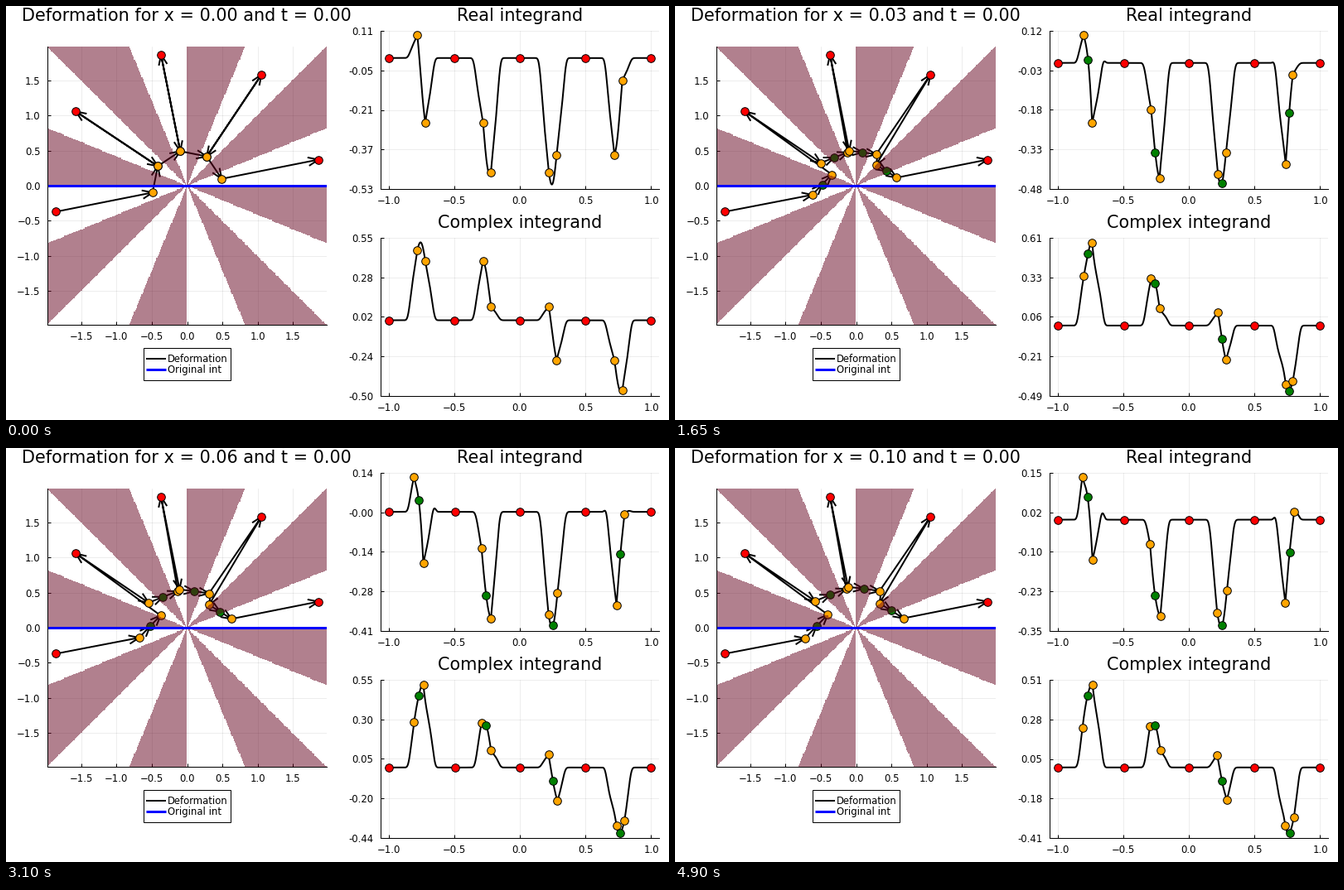
These frames come from a looping animation (800x500 px, 4.95 s). A matplotlib script:

```python
import numpy as np
import matplotlib.pyplot as plt
from matplotlib.animation import FuncAnimation
from matplotlib.patches import Rectangle

W, H, DPI = 800, 500, 100
FRAMES, INTERVAL = 99, 50
PX = 72 / DPI                      # one pixel in points
SPLIT = 27                         # frame at which the single ball breaks up
AMP, LIN, POW = 0.2398, 4.19, 2.81  # integrand constants

plt.rcParams.update({"font.family": "DejaVu Sans", "font.size": 8.4})

# End points in the valleys of exp(i z^8), walked from left to right
valleys = np.exp(1j * np.pi * (1 / 16 + np.arange(4, -1, -1) / 4))
ends = 1.8975 * valleys

# Entry, saddle and exit of each ball at x = 0.1
balls = np.array([
    [-0.726 - 0.152j, -0.563 + 0.020j, -0.402 + 0.185j],
    [-0.582 + 0.378j, -0.366 + 0.467j, -0.140 + 0.552j],
    [-0.115 + 0.580j, 0.1057 + 0.554j, 0.332 + 0.521j],
    [0.3315 + 0.346j, 0.500 + 0.242j, 0.670 + 0.133j],
])


def path(i, x):
    """Nodes of the deformed contour and their colours."""
    nodes, kinds = [], []
    for k in range(4):
        if i < SPLIT:
            inner, names = [0.5 * valleys[k], 0.5 * valleys[k + 1]], "oo"
        else:
            inner, names = balls[k] * (x / 0.1) ** (1 / 7), "ogo"
        nodes += [ends[k], *inner]
        kinds += ["r", *names]
    return np.array(nodes + [ends[4]]), np.array(kinds + ["r"])


def integrand(z, x):
    return -1j * AMP / z * np.exp(1j * (POW * z ** 8 + LIN * x * z))


def arrows(nodes):
    """Shafts and open heads as one polyline broken by NaN."""
    out = []
    for a, b in zip(nodes[:-1], nodes[1:]):
        u = (b - a) / abs(b - a)
        out += [a, b, np.nan,
                b + u * (-0.145 + 0.06j), b, b + u * (-0.145 - 0.06j), np.nan]
    return np.array(out)


fig = plt.figure(figsize=(W / DPI, H / DPI), dpi=DPI, facecolor="white")


def panel(left, top, right, bottom):
    ax = fig.add_axes([left / W, 1 - bottom / H,
                       (right - left) / W, (bottom - top) / H])
    ax.set_facecolor("none")
    ax.set_axisbelow(True)
    ax.grid(color="black", alpha=0.1, lw=0.5)
    ax.tick_params(direction="in", length=4 * PX, width=PX)
    ax.tick_params(axis="x", pad=6.1)
    ax.tick_params(axis="y", pad=6.3)
    for side in ("top", "right"):
        ax.spines[side].set_visible(False)
    for side in ("left", "bottom"):
        ax.spines[side].set(linewidth=PX, zorder=6)
    return ax


def markers(ax):
    return {kind: ax.plot([], [], "o", ms=9.6 * PX, mfc=color, mec="black",
                          mew=PX, clip_on=False, zorder=3)[0]
            for kind, color in (("r", "red"), ("o", "orange"), ("g", "green"))}


def place(dots, kinds, xs, ys):
    for kind, dot in dots.items():
        dot.set_data(xs[kinds == kind], ys[kinds == kind])


# Complex plane
LIM, CELLS = 1.977, 300
plane = panel(50.3, 49, 386.8, 385)
plane.set(xlim=(-LIM, LIM), ylim=(-LIM, LIM),
          xticks=np.arange(-1.5, 2, 0.5), yticks=np.arange(-1.5, 2, 0.5))
shaft, = plane.plot([], [], color="black", lw=2 * PX, zorder=2,
                    solid_joinstyle="miter", solid_capstyle="butt")
plane_dots = markers(plane)

g = ((np.arange(CELLS) + 0.5) / CELLS * 2 - 1) * LIM
gx, gy = np.meshgrid(g, g)
shade = np.zeros((CELLS, CELLS, 4))
shade[..., :3] = np.array([100, 0, 29]) / 255
shade[..., 3] = np.where(np.sin(8 * np.arctan2(gy, gx)) < 0, 0.5, 0)
plane.imshow(shade, extent=(-LIM, LIM, -LIM, LIM), origin="lower",
             interpolation="nearest", aspect="auto", zorder=4)
plane.plot([-LIM, LIM], [0, 0], color="blue", lw=3 * PX, zorder=5)

# Integrand plots
plots = []
for top, part in ((30, np.real), (280, np.imag)):
    ax = panel(452, top, 788, top + 191)
    ax.set(xlim=(-1.06, 1.06), xticks=np.arange(-1, 1.5, 0.5))
    curve, = ax.plot([], [], color="black", lw=2 * PX, zorder=2)
    plots.append((ax, part, curve, markers(ax)))

# Titles and legend in pixel coordinates
page = fig.add_axes([0, 0, 1, 1])
page.set(xlim=(0, W), ylim=(H, 0))
page.axis("off")


def heading(x, y, s):
    return page.text(x, y, s, fontsize=14.95, ha="center", va="baseline")


title = heading(218.2, 18, "")
heading(620, 18, "Real integrand")
heading(620, 268, "Complex integrand")
page.add_patch(Rectangle((166, 413), 105, 38.5, fc="white", ec="black", lw=PX))
for y, color, width, label in ((426, "black", 2, "Deformation"),
                               (439, "blue", 3, "Original int")):
    page.plot([169, 192.5], [y, y], color=color, lw=width * PX,
              solid_capstyle="butt")
    page.text(195, y + 4.2, label, va="baseline")


def update(i):
    x = 0.1 * i / (FRAMES - 1)
    title.set_text(f"Deformation for x = {x:.2f} and t = 0.00")

    nodes, kinds = path(i, x)
    line = arrows(nodes)
    shaft.set_data(line.real, line.imag)
    place(plane_dots, kinds, nodes.real, nodes.imag)

    # Arc length scaled to [-1, 1]
    s = np.concatenate([[0], np.cumsum(abs(np.diff(nodes)))])
    s = 2 * s / s[-1] - 1
    t = np.sort(np.concatenate([np.linspace(-1, 1, 1200), s]))
    z = np.interp(t, s, nodes.real) + 1j * np.interp(t, s, nodes.imag)
    values, at_nodes = integrand(z, x), integrand(nodes, x)

    for ax, part, curve, dots in plots:
        v = part(values)
        pad = 0.03 * np.ptp(v)
        ticks = np.linspace(v.min() - pad, v.max() + pad, 5)
        curve.set_data(t, v)
        place(dots, kinds, s, part(at_nodes))
        ax.set_ylim(ticks[0], ticks[-1])
        ax.set_yticks(ticks, [f"{q:.2f}" for q in ticks])
    return []


anim = FuncAnimation(fig, update, frames=FRAMES, interval=INTERVAL,
                     init_func=lambda: update(0), repeat=True, blit=False)
plt.show()
```
